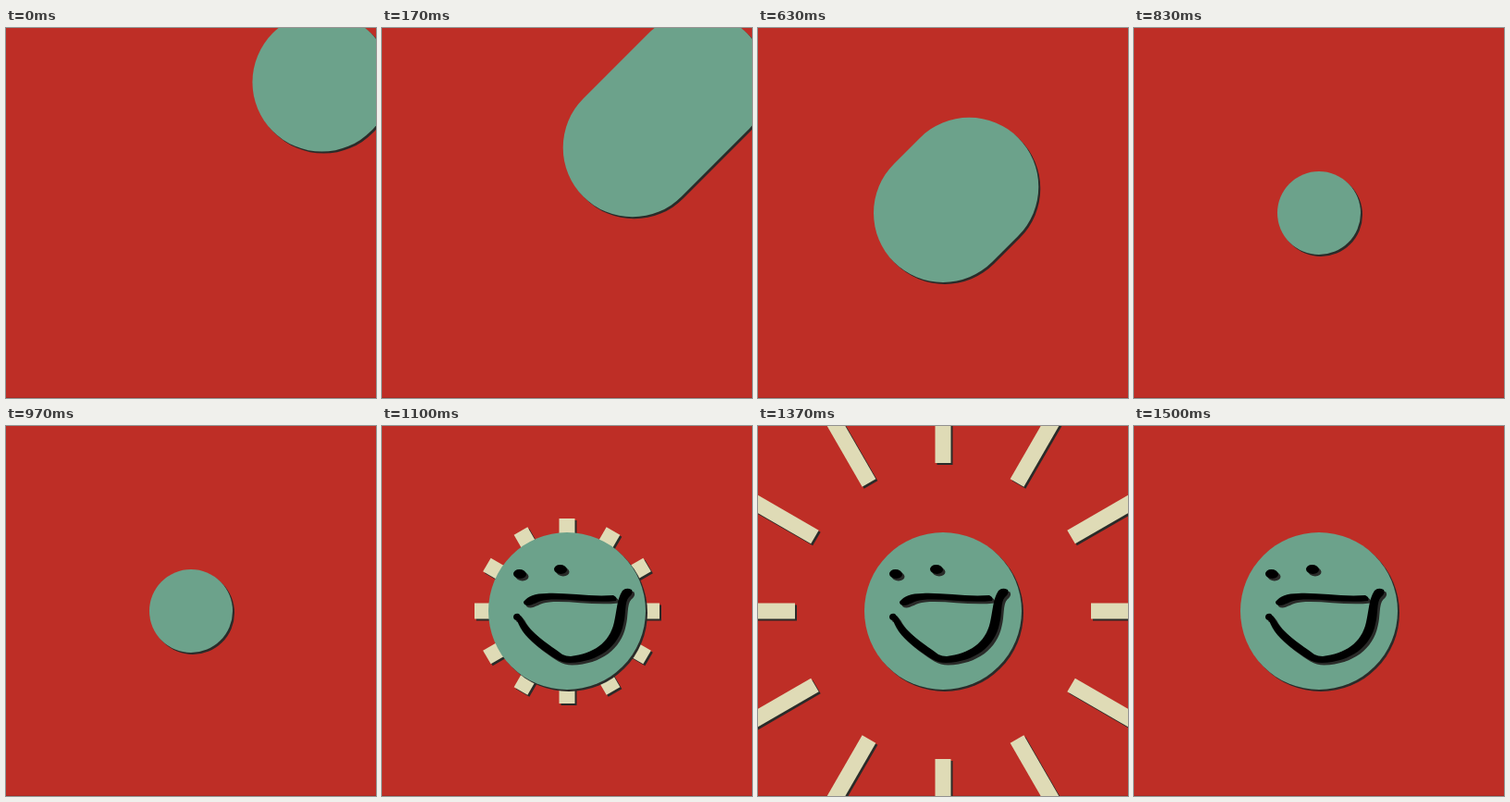
Recreate the animation shown at these times as an HTML page. Size 400 by 400 pixels, loop 2000 ms.

```html
<!DOCTYPE html>
<html lang="en">
<head>
<meta charset="utf-8">
<title>Sunny ball</title>
<style>
  html, body { margin: 0; width: 100%; height: 100%; overflow: hidden; background: #be2e26; }
  svg { display: block; width: 100vw; height: 100vh; }
</style>
</head>
<body>
<svg id="stage" viewBox="0 0 400 400">
  <rect width="400" height="400" fill="#be2e26"/>
  <rect y="399" width="400" height="1" fill="#a92a23"/>
</svg>
<script>
const NS = 'http://www.w3.org/2000/svg';
const stage = document.getElementById('stage');
const SHADOW = '#2a2b29', TEAL = '#6ca28b', CREAM = '#dfdbb6';
const LOOP = 2000, FPS = 30;
const SPEED = 20, REACH = 200, RAY = 100;
const FACE_AT = 33;

function add(parent, name, attrs) {
  const el = document.createElementNS(NS, name);
  for (const key in attrs) el.setAttribute(key, attrs[key]);
  return parent.appendChild(el);
}

// A path with a hard shadow under it
function shaded(parent, paint, color, shift, attrs) {
  const move = `translate(${shift} ${shift})`;
  return [
    add(parent, 'path', { ...attrs, [paint]: SHADOW, transform: move }),
    add(parent, 'path', { ...attrs, [paint]: color })
  ];
}

function set(pair, key, value) {
  pair.forEach(el => el.setAttribute(key, value));
}

// Point at distance d from the centre, angle in degrees
function polar(d, deg) {
  const a = deg * Math.PI / 180;
  return `${200 + d * Math.cos(a)} ${200 + d * Math.sin(a)}`;
}

const segment = (a, b, deg) => `M${polar(a, deg)}L${polar(b, deg)}`;

const rayLayer = add(stage, 'g', {});
const rays = Array.from({ length: 12 }, (_, i) => ({
  deg: i * 30,
  pair: shaded(rayLayer, 'stroke', CREAM, 2, { 'stroke-width': 17 })
}));

const ball = shaded(stage, 'stroke', TEAL, 2, { 'stroke-linecap': 'round' });

const face = add(stage, 'g', {});
const eye = (x, y) => `M${x - 7} ${y}a7 5 5 1 1 14 0a7 5 5 1 1 -14 0Z`;
const lip = 'M153 190C158 184 165 181 178 181C200 180 225 185 250 183Q255 185 253 189' +
  'C228 192 200 186 178 188C168 189 163 194 158 194Q153 194 153 190Z';
const smile = 'M142 206Q143 202 148 203L152 208C160 224 182 237 195 247Q199 249 204 249' +
  'C228 246 246 235 251 212C254 199 254 187 260 178Q264 174 270 177Q272 181 267 185' +
  'C262 190 264 204 261 214C256 238 235 255 203 256C192 256 185 250 172 241' +
  'C158 230 150 222 146 210Q142 210 142 206Z';
for (const d of [eye(149, 160), eye(193, 155), lip, smile])
  shaded(face, 'fill', '#000', 2.5, { d });

function radius(f) {
  if (f <= 22) return 75;
  return f < FACE_AT ? 25 + 10 * Math.abs(f - 27) : 85;
}

function draw(ms) {
  // Motion advances in steps of one thirtieth of a second
  const f = Math.min(59, Math.floor((ms % LOOP + 3.4) * FPS / 1000));
  const head = Math.max(0, REACH - SPEED * f);
  const tail = Math.max(0, REACH - SPEED * Math.max(0, f - 11));
  set(ball, 'd', segment(head, tail, -45));
  set(ball, 'stroke-width', 2 * radius(f));

  const smiling = f >= FACE_AT;
  face.style.display = smiling ? '' : 'none';
  rayLayer.style.display = smiling && f < 45 ? '' : 'none';
  const base = SPEED * Math.max(0, f - FACE_AT);
  for (const ray of rays) set(ray.pair, 'd', segment(base, base + RAY, ray.deg));
}

function tick(now) {
  draw(now);
  requestAnimationFrame(tick);
}
draw(0);
requestAnimationFrame(tick);
</script>
</body>
</html>
```
